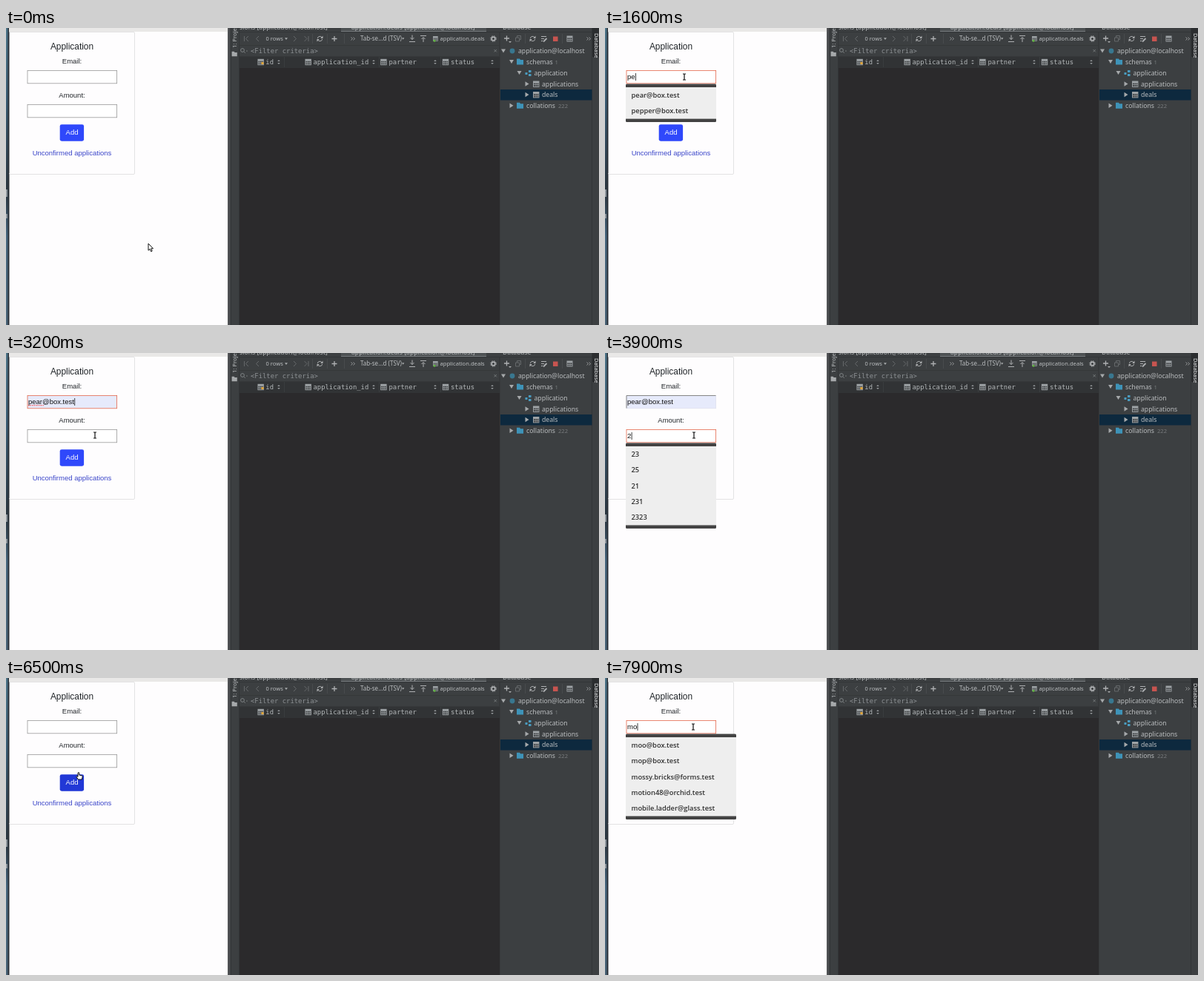
Recreate the animation shown at these times as an HTML page. Size 800 by 401 pixels, loop 8 s.

```html
<!DOCTYPE html>
<html lang="en">
<head>
<meta charset="utf-8">
<title>Application form and database</title>
<style>
  html, body { margin: 0; width: 100%; height: 100%; overflow: hidden; background: #3c3f41; }
  svg { display: block; width: 800px; height: 401px; }
  text { white-space: pre; }
  .form { font: 9.5px "Liberation Sans", Arial, sans-serif; fill: #212529; }
  .mid { text-anchor: middle; }
  .ide { font: 8.7px "Noto Sans", sans-serif; fill: #bbbec0; }
  .small { font-size: 7.6px; }
  .mono { font: 8.9px "DejaVu Sans Mono", monospace; fill: #b4b8ba; }
  .list { font: 600 9.3px "Open Sans", "Noto Sans", sans-serif; fill: #303030; }
  .line { fill: none; stroke: #afb1b3; }
  .dim { stroke: #65686a; }
  .soft { stroke: #7f8385; }
</style>
</head>
<body>
<svg viewBox="0 0 800 401">
  <defs>
    <linearGradient id="edge" x2="0" y2="1">
      <stop offset="0" stop-color="#4d7488"/>
      <stop offset=".25" stop-color="#3a5c74"/>
      <stop offset=".55" stop-color="#2b3640"/>
      <stop offset=".7" stop-color="#47677f"/>
      <stop offset="1" stop-color="#4a6478"/>
    </linearGradient>
    <g id="table">
      <path d="M0 0h8.4v8.4H0z" fill="#9da2a5"/>
      <path d="M1 3h1.8v1.8H1zm2.4 0h1.8v1.8H3.4zm2.4 0h1.6v1.8H5.8zM1 5.6h1.8v1.8H1zm2.4 0h1.8v1.8H3.4zm2.4 0h1.6v1.8H5.8z" fill="#3c3f41"/>
    </g>
    <path id="folder" d="M0 0h4l1 1.5h4V8H0z"/>
    <path id="sort" d="M-1.8 -1L0 -3 1.8 -1zM-1.8 1L0 3 1.8 1z" fill="#9a9da0"/>
    <path id="closed" d="M0 -3.2L5 0 0 3.2z" fill="#a6a9ab"/>
    <path id="open" d="M-3 -2.5h6L0 2.5z" fill="#a6a9ab"/>
    <path id="plus" class="line" d="M-3.5 0h7M0 -3.5v7" stroke-width="1.3"/>
    <g id="refresh">
      <path class="line" d="M-3.2 -.5A3.2 3.2 0 0 1 2.6 -1.8M3.2 .5A3.2 3.2 0 0 1 -2.6 1.8"/>
      <path d="M4 -4v3.5H.8zM-4 4V.5H-.8z" fill="#afb1b3"/>
    </g>
    <path id="more" class="line" d="M-2.5 -2l2 2-2 2M.5 -2l2 2-2 2" stroke-width=".8"/>
  </defs>

  <!-- browser page -->
  <rect width="3" height="401" fill="url(#edge)"/>
  <rect x="2.5" width="2" height="401" fill="#2a3138"/>
  <path d="M0 218h2v10H0zM0 251h2v6H0z" fill="#8e969d"/>
  <rect x="4.5" width="295" height="401" fill="#fefdfe"/>
  <rect x="4" width="295.5" height="5" fill="#e9e8e7"/>
  <path d="M4.5 5.5H172q1.5 0 1.5 1.5V196q0 1.5-1.5 1.5H6q-1.5 0-1.5-1.5" fill="none" stroke="#e3e3e4"/>
  <g class="form mid">
    <text x="89" y="28.5" style="font-size:11.9px">Application</text>
    <text x="89" y="48.2">Email:</text>
    <text x="89" y="94.3">Amount:</text>
    <rect id="button" x="72.7" y="130.2" width="32.4" height="22.5" rx="2.4"/>
    <text x="89" y="144.3" fill="#fff">Add</text>
    <text x="89" y="172" fill="#3a45c9">Unconfirmed applications</text>
  </g>
  <g id="fields" class="form"></g>
  <g id="lists" class="list"></g>

  <!-- database tool -->
  <rect x="299.5" width="501" height="401" fill="#3c3f41"/>
  <rect x="299.5" width="3" height="401" fill="#4a4c4f"/>
  <path d="M303.5 0v401M314.5 0v401M790.5 0v401M666 5v396" stroke="#323537"/>
  <g class="ide small">
    <text transform="translate(311 27) rotate(-90)">1: Project</text>
    <use href="#folder" transform="translate(304.6 31.8) scale(.8)" fill="#a6a9ab"/>
    <text x="315" y="2.2" style="font-size:8.7px">sions [application@localhost]</text>
    <rect x="452" width="196" height="4.5" fill="#4e5254"/>
    <text x="466" y="2.2" style="font-size:8.7px">application.deals [application@localhost]</text>
    <path d="M452 4.5h196" stroke="#777b7e"/>
    <text x="670" y="1.6" style="font-size:8.7px">Database</text>
    <rect x="791" width="9" height="39" fill="#2b2d2f"/>
    <text transform="translate(794 7) rotate(90)" fill="#e8e9ea">Database</text>
  </g>
  <path d="M315 5.5h476" stroke="#323537"/>

  <path class="line dim" d="M321.5 11v7M327 11l-3.5 3.5L327 18M341 11l-3.5 3.5L341 18M388 11l3.5 3.5L388 18M402.5 11l3.5 3.5-3.5 3.5M408 11v7"/>
  <text class="ide small" x="350.5" y="17.3">0 rows</text>
  <path d="M376 13.3h4l-2 2.6zM534 13.3h3.4l-1.7 2.4z" fill="#a6a9ab"/>
  <path d="M413.5 8v13M433.5 8v13M456.5 8v13M700.5 8v13M750.5 8v13" stroke="#484b4d"/>
  <use href="#refresh" x="423.5" y="14.5"/>
  <use href="#plus" x="443" y="14.5"/>
  <use href="#more" x="468" y="14.5"/>
  <text class="ide" x="478" y="17.3" style="font-size:8px">Tab-se...d (TSV)</text>
  <path class="line" d="M548 9.5v6M545.5 13l2.5 2.5 2.5-2.5M544 18.5h8M563 19v-6M560.5 15l2.5-2.5 2.5 2.5M559 10.5h8"/>
  <use href="#table" transform="translate(576 11) scale(.8)"/>
  <circle cx="578" cy="17.2" r="1.5" fill="#62b543"/>
  <text class="ide small" x="585.5" y="17.3">application.deals</text>
  <circle class="line" cx="657.5" cy="14.5" r="2.4" stroke-width="1.6"/>
  <circle class="line" cx="657.5" cy="14.5" r="3.8" stroke-dasharray="1.6 1.4"/>

  <rect x="315" y="38" width="351" height="363" fill="#2b2a2c"/>
  <rect x="315" y="38" width="351" height="16" fill="#313335"/>
  <path d="M315 23.5h351M315 38.5h351" stroke="#353839"/>
  <path d="M375.5 39v14M503.5 39v14M586.5 39v14" stroke="#3a3d3f"/>
  <circle class="line soft" cx="319" cy="30" r="2.4"/>
  <path class="line soft" d="M321 32l2 2M324 31h2M658.5 29l3.4 3.4m0-3.4l-3.4 3.4" stroke-width=".8"/>
  <g class="mono">
    <text x="330" y="33.7" fill="#8d9194">&lt;Filter criteria&gt;</text>
    <text x="350.3" y="49">id</text>
    <text x="414.5" y="49">application_id</text>
    <text x="516.5" y="49">partner</text>
    <text x="600" y="49">status</text>
  </g>
  <use href="#table" x="339.5" y="41.8"/>
  <circle cx="346" cy="47.5" r="1.8" fill="#e0a63c"/>
  <use href="#table" x="403.5" y="41.8"/>
  <use href="#table" x="505.2" y="41.8"/>
  <use href="#table" x="588.8" y="41.8"/>
  <use href="#sort" x="368" y="46"/>
  <use href="#sort" x="496" y="46"/>
  <use href="#sort" x="579" y="46"/>
  <use href="#sort" x="656" y="46"/>

  <use href="#plus" x="675.5" y="14"/>
  <path d="M678 18h4l-2 2z" fill="#afb1b3"/>
  <path class="line dim" d="M687.5 13h5v5h-5zM689.5 13v-2.5h5v5h-2"/>
  <use href="#refresh" x="710.5" y="14.5"/>
  <path class="line" d="M722 11.5h7M722 14.5h4M722 17.5h2"/>
  <path class="line" d="M725 18.5l4.5-4.5" stroke-width="1.8"/>
  <rect x="738" y="11.5" width="6.5" height="6.5" fill="#c75450"/>
  <use href="#table" transform="translate(756.5 10.5) scale(.95)"/>
  <use href="#more" x="786" y="14.5"/>

  <rect x="667" y="83" width="123.5" height="14.5" fill="#0d293e"/>
  <use href="#open" x="671" y="31"/>
  <use href="#open" x="682" y="45.5"/>
  <use href="#open" x="692.5" y="60.5"/>
  <use href="#closed" x="700.5" y="75.5"/>
  <use href="#closed" x="700.5" y="90"/>
  <use href="#closed" x="679.5" y="104.8"/>
  <circle cx="683" cy="31" r="3.4" fill="#39778f"/>
  <use href="#folder" x="689" y="41.5" fill="#3e93b8"/>
  <path d="M700.5 60h3v3h-3zM705 57h3.5v3H705zM705 62h3.5v3H705z" fill="#4a9cc0"/>
  <use href="#table" x="711" y="71.5"/>
  <use href="#table" x="711" y="86"/>
  <use href="#folder" x="689" y="100.8" fill="#3e93b8"/>
  <g class="ide">
    <text x="691" y="34">application@localhost</text>
    <text x="702" y="48.7">schemas</text>
    <text x="740.5" y="48.5" class="small" fill="#787b7d">1</text>
    <text x="712.5" y="63.7">application</text>
    <text x="723" y="78.7">applications</text>
    <text x="723" y="93.3">deals</text>
    <text x="702" y="108">collations</text>
    <text x="745" y="108" class="small" fill="#787b7d">222</text>
  </g>

  <g id="cursor" stroke-linejoin="round">
    <path id="arrow" d="M0 0v9.3l2.1-1.9 1.5 3.4 1.6-.7-1.5-3.3h2.8z" fill="#fff" stroke="#111"/>
    <path id="beam" d="M-2 -4h1.2q.8 0 .8.8v6.4q0 .8-.8.8H-2M2 -4H.8q-.8 0-.8.8v6.4q0 .8.8.8H2" fill="none" stroke="#111" stroke-width="1.2"/>
    <path id="hand" d="M-1 0q1-1 1.8 0v3l3.5.8q1 .3.8 1.5L4.4 9H-.6L-3 5.6q0-1.2 1.2-.8l.8.6z" fill="#fff" stroke="#111"/>
  </g>
</svg>

<script>
const LOOP = 8000, STEP = 100;
const byId = id => document.getElementById(id);
const show = (node, on) => node.setAttribute('visibility', on ? 'visible' : 'hidden');

function add(parent, tag, attrs, content = '') {
  const node = document.createElementNS('http://www.w3.org/2000/svg', tag);
  for (const key in attrs) node.setAttribute(key, attrs[key]);
  node.textContent = content;
  return parent.appendChild(node);
}

// [start, value] pairs; each value holds until the next start
const emailTyping = [[0, ''], [1400, 'p'], [1500, 'pe'], [2200, 'pear@box.test'], [6000, ''], [7800, 'm'], [7900, 'mo']];
const amountTyping = [[0, ''], [3800, '2'], [4300, '20'], [4500, '200'], [4700, '2000'], [6000, '']];
const focusSteps = [[0, ''], [1000, 'email'], [3300, 'amount'], [5900, ''], [7000, 'email']];
const cursorPath = [
  [0, 192, 291], [100, 192, 291], [900, 107, 66], [1700, 107, 66], [2100, 90, 91], [2200, 90, 91],
  [3100, 120, 111], [5100, 120, 111], [5400, 100, 119], [5700, 97, 138], [6100, 97, 138],
  [6500, 98, 128], [6900, 119, 66], [LOOP, 119, 66]
];
const current = (steps, t) => steps.filter(step => step[0] <= t).pop();

function makeField(name, y, typing) {
  const group = byId('fields');
  return {
    name, typing,
    box: add(group, 'rect', { x: 29, y: y + .4, width: 120.6, height: 17.4, 'stroke-width': .8 }),
    inset: add(group, 'path', { d: `M29 ${y + 17.5}v-17h120.5`, fill: 'none', stroke: '#858585' }),
    label: add(group, 'text', { x: 30, y: y + 12.2, fill: '#111' }),
    caret: add(group, 'rect', { y: y + 4, width: .8, height: 10, fill: '#111' })
  };
}
const fields = [makeField('email', 57, emailTyping), makeField('amount', 103, amountTyping)];
const squiggle = add(byId('fields'), 'path', {
  d: 'M30 70.8h21', stroke: '#e33', 'stroke-dasharray': '1.5 1'
});

function makeList(start, end, y, width, items) {
  const node = add(byId('lists'), 'g', {}), body = items.length * 21.3;
  add(node, 'rect', { x: 28, y, width, height: body + 9, rx: 1.5, fill: '#434343' });
  add(node, 'rect', { x: 28, y: y + 4.5, width, height: body, fill: '#eee' });
  items.forEach((item, i) => add(node, 'text', { x: 35.5, y: y + 18.7 + i * 21.2 }, item));
  return { node, start, end, y };
}
const lists = [
  makeList(1400, 2200, 75.5, 122, ['pear@box.test', 'pepper@box.test']),
  makeList(3800, 4300, 121.5, 122, ['23', '25', '21', '231', '2323']),
  makeList(7800, LOOP, 75.5, 149, [
    'moo@box.test', 'mop@box.test', 'mossy.bricks@forms.test',
    'motion48@orchid.test', 'mobile.ladder@glass.test'
  ])
];

function drawField(field, t, focus) {
  const { name, box, inset, label, caret } = field;
  const [typedAt, value] = current(field.typing, t);
  const [focusedAt, focusName] = focus;
  const focused = focusName === name;
  const filled = name === 'email' && t >= 2200 && t < 6000;
  box.setAttribute('fill', filled ? '#e6eafb' : '#fff');
  box.setAttribute('stroke', focused ? '#e4694e' : filled ? '#dfe2ee' : '#999');
  show(inset, filled && !focused);
  label.textContent = value;
  caret.setAttribute('x', 30.4 + label.getComputedTextLength());
  const idle = t - Math.max(typedAt, focusedAt);
  show(caret, focused && idle % 1000 < 500);
}

function drawCursor(t, openLists) {
  const next = cursorPath.findIndex(key => key[0] > t);
  const [t0, x0, y0] = cursorPath[next - 1], [t1, x1, y1] = cursorPath[next];
  const p = (t - t0) / (t1 - t0), ease = p * p * (3 - 2 * p);
  const x = x0 + (x1 - x0) * ease, y = y0 + (y1 - y0) * ease;
  const overList = openLists.some(list => y > list.y);
  const inField = !overList && x > 29 && x < 150 && (y > 57 && y < 75 || y > 103 && y < 121);
  const onButton = !overList && x > 73 && x < 105 && y > 126 && y < 153;
  byId('cursor').setAttribute('transform', `translate(${x} ${y})`);
  show(byId('beam'), inField);
  show(byId('hand'), onButton);
  show(byId('arrow'), !inField && !onButton);
  byId('button').setAttribute('fill', onButton ? '#2138d6' : '#2f48fb');
}

function draw(now) {
  const t = Math.floor(now % LOOP / STEP) * STEP;
  const focus = current(focusSteps, t);
  fields.forEach(field => drawField(field, t, focus));
  show(squiggle, t >= 2200 && t < 3300);
  const openLists = lists.filter(list => t >= list.start && t < list.end);
  lists.forEach(list => show(list.node, openLists.includes(list)));
  drawCursor(t, openLists);
}

const begin = performance.now();
(function tick() {
  draw(performance.now() - begin);
  requestAnimationFrame(tick);
})();
</script>
</body>
</html>
```
